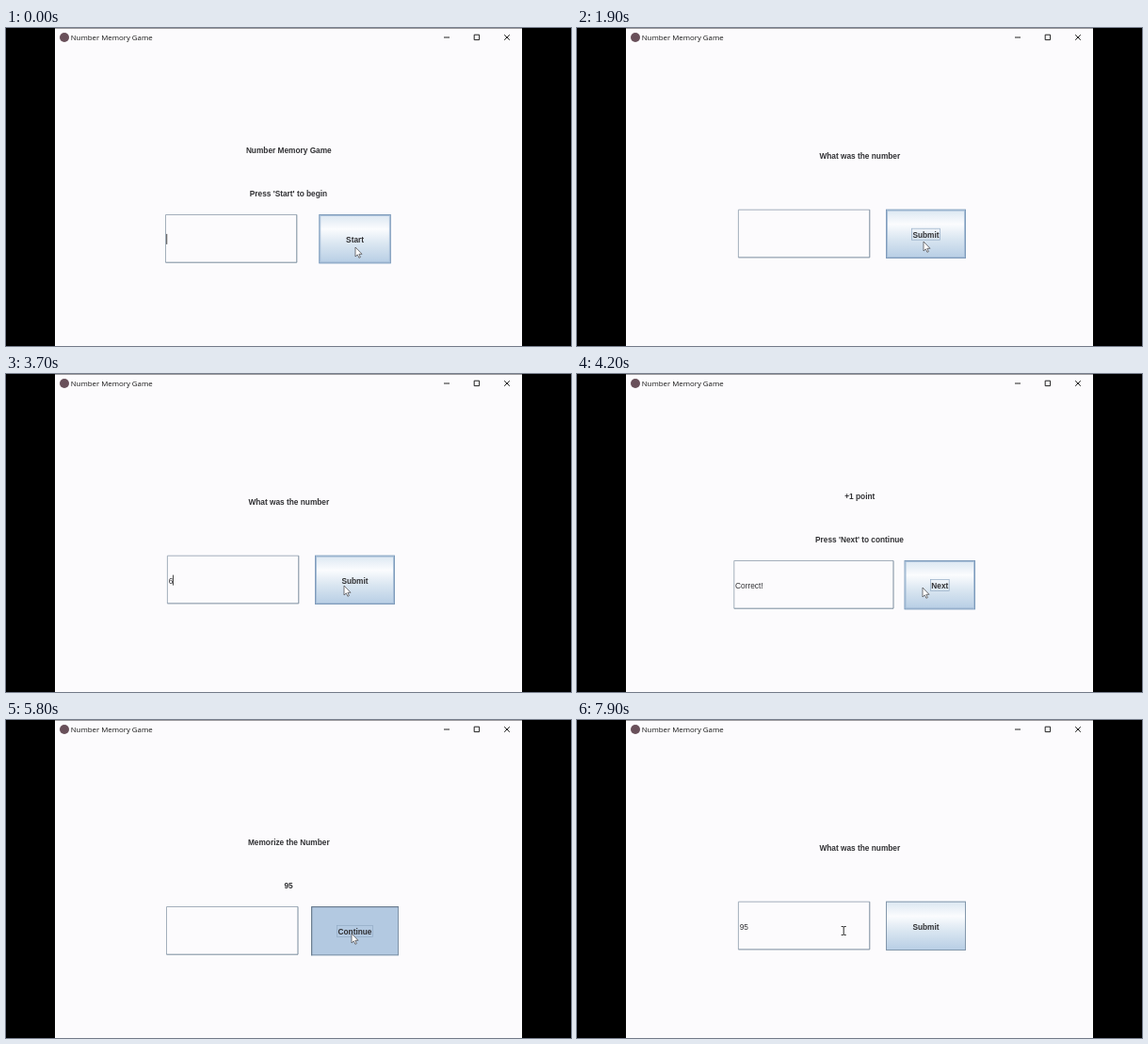
Recreate the animation shown at these times as an HTML page. Size 600x338 px, loop 8000 ms.

```html
<!DOCTYPE html>
<html lang="en">
<head>
<meta charset="utf-8">
<title>Number Memory Game</title>
<style>
  html, body { margin: 0; width: 100%; height: 100%; overflow: hidden; background: #000; }
  svg { display: block; width: 100vw; height: 100vh; }
  text { font: 8.3px "Liberation Sans", Arial, sans-serif; fill: #303033; white-space: pre; }
  .bold { font-weight: bold; text-anchor: middle; }
  .title { font: 7.85px "Open Sans", "Noto Sans", sans-serif; fill: #161616; }
  .line { fill: none; stroke-width: 1; }
</style>
</head>
<body>
<svg viewBox="0 0 600 338">
  <defs>
    <linearGradient id="ocean" x1="0" y1="0" x2="0" y2="1">
      <stop offset="0" stop-color="#dae6f1"/>
      <stop offset=".3" stop-color="#fbfcfe"/>
      <stop offset=".6" stop-color="#dae6f1"/>
      <stop offset="1" stop-color="#b6cde4"/>
    </linearGradient>
  </defs>

  <rect width="600" height="338"/>
  <rect x="52" width="496" height="338" fill="#fcfbfd"/>
  <rect x="52" width="496" height=".7" fill="#77777a"/>
  <circle cx="62" cy="10" r="5" fill="#69505a"/>
  <text class="title" x="68.7" y="13">Number Memory Game</text>
  <path class="line" stroke="#222" stroke-width=".9" d="M465 10H471M497.2 7.2H502.6V12.6H497.2ZM529.2 7.2L534.8 12.8M534.8 7.2L529.2 12.8"/>

  <text class="bold" id="heading" x="300.3"></text>
  <text class="bold" id="detail" x="300" y="178.9"></text>

  <g id="field">
    <path class="line" id="fieldTopLeft" stroke="#a3afbb"/>
    <path class="line" id="fieldBottomRight" stroke="#788b9c"/>
    <text id="entry"></text>
    <rect id="caret" width=".9" height="11" fill="#333"/>
  </g>

  <rect id="face"/>
  <rect class="line" id="edge"/>
  <rect class="line" id="glow" stroke="#a2bbd5"/>
  <path class="line" id="shade" stroke="#67788b"/>
  <rect class="line" id="focus" stroke="#93abc5" style="stroke-width:.7"/>
  <text class="bold" id="caption"></text>

  <path id="arrow" d="M0 0V10L2.3 7.9L3.9 11.3L5.4 10.6L3.9 7.3H7Z" fill="#fff" stroke="#4a4a4e" stroke-width=".75" stroke-linejoin="round"/>
  <path id="beam" class="line" stroke="#2b2b2b" d="M-2.5 -4.5H-.7L0 -4L.7 -4.5H2.5M0 -4V4M-2.5 4.5H-.7L0 4L.7 4.5H2.5"/>
</svg>
<script>
const LOOP = 8000, STEP = 100;

const ui = {};
document.querySelectorAll("svg [id]").forEach(el => ui[el.id] = el);

// field: left, right; button: left, right; top is shared by both
const memorize = detail => ({
  heading: "Memorize the Number", detail, caption: "Continue",
  top: 198, field: [170.5, 310.5], button: [324, 417]
});
const question = {
  heading: "What was the number", detail: "", caption: "Submit",
  top: 192.7, field: [171.4, 311.3], button: [328, 413]
};

const screens = [
  [0, { heading: "Number Memory Game", detail: "Press 'Start' to begin", caption: "Start",
        top: 198, field: [169.5, 309.3], button: [332.3, 408.8] }],
  [700, memorize("6")],
  [1900, question],
  [4200, { heading: "+1 point", detail: "Press 'Next' to continue", caption: "Next",
           top: 198, field: [166.8, 336.5], button: [347.6, 423] }],
  [4900, memorize("95")],
  [5900, question]
];
const entries = [[0, ""], [3400, "6"], [4200, "Correct!"], [4900, ""], [7300, "9"], [7500, "95"]];

const caretSpans = [[0, 200], [2500, 3000], [3400, 3900], [6300, 6800], [7300, 7900]];
const pressSpans = [[1800, 1900], [4000, 4200], [4800, 4900], [5800, 5900]];
const focusSpans = [[700, 2500], [4000, 6300]];

// time, x, y
const path = [
  [0, 371, 233], [100, 372, 231], [300, 371, 228], [1500, 371, 228], [1600, 368, 227],
  [2100, 368, 227], [2500, 286, 215], [2700, 286, 215], [3000, 279.6, 214],
  [3200, 285, 214], [3600, 342, 222], [3700, 359, 225], [3900, 359, 225],
  [4000, 367, 227], [5900, 367, 227], [6300, 283.2, 224], [LOOP, 283.2, 224]
];

const latest = (list, t) => list.filter(([at]) => at <= t).pop()[1];
const within = (spans, t) => spans.some(([a, b]) => t >= a && t < b);
const show = (el, on) => el.setAttribute("visibility", on ? "visible" : "hidden");
const set = (el, attrs) => { for (const k in attrs) el.setAttribute(k, attrs[k]); };

function pointer(t) {
  const i = path.findIndex(p => p[0] > t);
  const [t0, x0, y0] = path[i - 1], [t1, x1, y1] = path[i];
  const k = (t - t0) / (t1 - t0);
  return [x0 + (x1 - x0) * k, y0 + (y1 - y0) * k];
}

function box(el, left, top, right, bottom, inset = 0) {
  set(el, { x: left + inset, y: top + inset,
            width: right - left - 2 * inset, height: bottom - top - 2 * inset });
}

function drawField({ top, field: [left, right] }, entry, caretOn) {
  const l = left, r = right - .5, a = top + .5, b = top + 51.2;
  set(ui.fieldTopLeft, { d: `M${l} ${b}V${a}H${r}` });
  set(ui.fieldBottomRight, { d: `M${r} ${a}V${b}H${l}` });
  ui.entry.textContent = entry;
  set(ui.entry, { x: left + 1.3, y: top + 29.9 });
  set(ui.caret, { x: left + .8 + entry.length * 4.8, y: top + 20.9 });
  show(ui.caret, caretOn);
}

function drawButton({ top, button: [left, right], caption }, hover, pressed, focused) {
  const bottom = top + 52.3, mid = (left + right) / 2;
  box(ui.face, left, top, right, bottom);
  set(ui.face, { fill: pressed ? "#b3c9e1" : "url(#ocean)" });
  box(ui.edge, left, top, right, bottom, .5);
  set(ui.edge, { stroke: pressed ? "#7d91a6" : hover ? "#7b98b8" : "#8397ab" });
  box(ui.glow, left, top, right, bottom, 1.4);
  show(ui.glow, hover && !pressed);
  set(ui.shade, { d: `M${left + .7} ${bottom}V${top + .7}H${right}` });
  show(ui.shade, pressed);
  ui.caption.textContent = caption;
  set(ui.caption, { x: mid, y: top + 29.9 });
  const half = ui.caption.getComputedTextLength() / 2 + .9;
  box(ui.focus, mid - half, top + 20.5, mid + half, top + 32.5);
  show(ui.focus, focused);
}

function draw(time) {
  const t = Math.floor(time % LOOP / STEP) * STEP;
  const screen = latest(screens, t), [x, y] = pointer(t);
  const over = ([left, right]) => x >= left && x <= right && y >= screen.top && y <= screen.top + 52;

  ui.heading.textContent = screen.heading;
  set(ui.heading, { y: screen.detail ? 133.2 : 138.8 });
  ui.detail.textContent = screen.detail;
  drawField(screen, latest(entries, t), within(caretSpans, t));
  drawButton(screen, over(screen.button), within(pressSpans, t), within(focusSpans, t));

  const typing = over(screen.field);
  show(ui.beam, typing);
  show(ui.arrow, !typing);
  set(typing ? ui.beam : ui.arrow, { transform: `translate(${x} ${y})` });
}

const start = performance.now();
function tick() {
  draw(performance.now() - start);
  requestAnimationFrame(tick);
}
tick();
</script>
</body>
</html>
```
